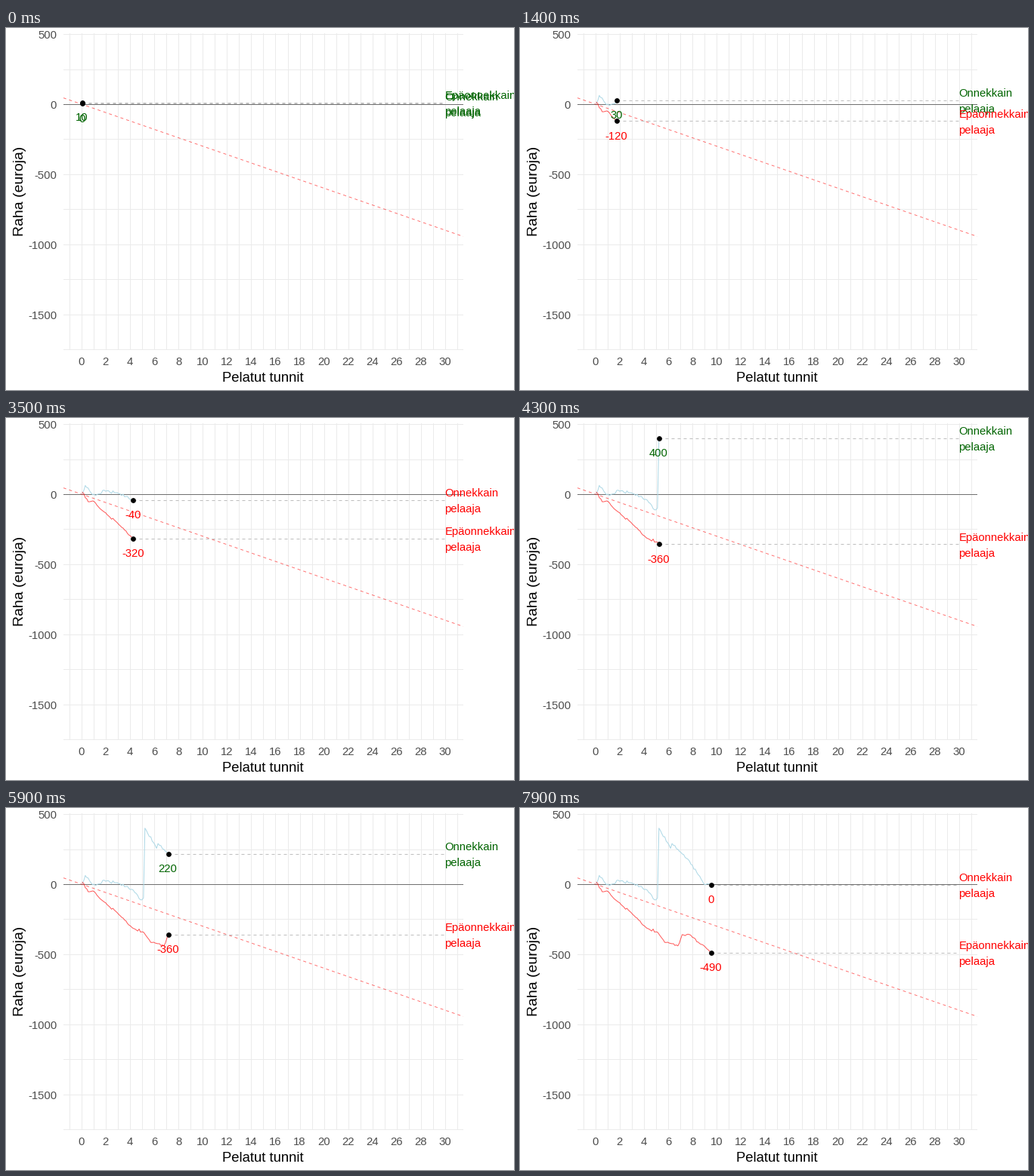
Animation of 672 by 480 pixels, one loop 8000 ms. Source, as a matplotlib script:

```python
import numpy as np
import matplotlib.pyplot as plt
from matplotlib.animation import FuncAnimation

plt.rcParams["font.family"] = "Liberation Sans"

W, H, DPI = 672, 480, 96
PX = 72 / DPI                                # one pixel in points
FRAMES, INTERVAL = 80, 100
HOURS = 0.07 + 0.12 * np.arange(FRAMES)      # hours played in each frame
LEFT, RIGHT, TOP, BOTTOM = 75.87, 605.02, 6.5, 426.5
LOW, HIGH = -1752.8, 508.9
EURO_PER_PX = (HIGH - LOW) / (BOTTOM - TOP)
GREY, GRID = "#4d4d4d", "#ebebeb"

# Turning points of each balance: (hours, euros)
LUCKY = [(.07, 4), (.31, 62), (.9, -4), (1.6, 3), (1.75, 27), (2.95, 10),
         (4.27, -43), (4.9, -116), (5.11, -98), (5.23, 400), (6.07, 278),
         (6.19, 256), (6.31, 290), (7.15, 216), (7.63, 178), (9, -6),
         (9.55, -4)]
UNLUCKY = [(.07, 13), (.57, -58), (1, -48), (1.75, -119), (2.95, -204),
           (4.27, -316), (5.15, -342), (5.7, -416), (6.07, -420),
           (6.83, -440), (7.15, -360), (7.7, -356), (9.55, -490)]

fig = plt.figure(figsize=(W / DPI, H / DPI), dpi=DPI, facecolor="white")
ax = fig.add_axes([LEFT / W, 1 - BOTTOM / H,
                   (RIGHT - LEFT) / W, (BOTTOM - TOP) / H])
ax.set(xlim=(-1.5, 31.5), ylim=(LOW, HIGH))
ax.axis("off")


def wander(keys, seed, jitter=11):
    """Balance per frame: straight runs with noise that fades at each key."""
    hours, euros = np.transpose(keys)
    leg = np.interp(HOURS, hours, np.arange(len(keys)))
    noise = np.random.default_rng(seed).uniform(-jitter, jitter, FRAMES)
    return np.interp(HOURS, hours, euros) + noise * np.sin(np.pi * leg)


def stroke(xs, ys, color, z, dashed=False, alpha=1):
    return ax.plot(xs, ys, color=color, lw=PX, zorder=z, alpha=alpha,
                   ls=(0, (4, 4)) if dashed else "-")[0]


def page_text(x, y, s, size, color="black", ha="center", **kw):
    fig.text(x / W, 1 - y / H, s, size=size, color=color, ha=ha,
             va="baseline", **kw)


for h in range(-1, 32):
    stroke([h, h], [LOW, HIGH], GRID, 0)
    if h % 2 == 0:
        page_text(99.8 + 16.035 * h, 447, str(h), 11.2, GREY)
for e in range(-1750, 501, 250):
    stroke([-1.5, 31.5], [e, e], GRID, 0)
    if e % 500 == 0:
        page_text(67.2, 107 - e / EURO_PER_PX, str(e), 11.2, GREY, "right")
page_text(339.5, 469, "Pelatut tunnit", 13.9)
page_text(23, 216, "Raha (euroja)", 14.5, rotation=90,
          rotation_mode="anchor")

stroke([-1.5, 31.5], [0, 0], "#707070", 1)
stroke([-1.5, 31.5], [45, -945], "red", 1, dashed=True, alpha=0.55)


class Player:
    def __init__(self, name, euros, color, alpha, z):
        self.euros = euros
        self.trail = stroke([], [], color, 2, alpha=alpha)
        self.guide = stroke([], [], "#bebebe", 3, dashed=True)
        self.dot, = ax.plot([], [], "o", color="black", ms=6.8 * PX, mew=0,
                            zorder=4)
        font = dict(size=11.1, va="baseline", zorder=z)
        self.value = ax.text(0, 0, "", ha="center", **font)
        self.names = [ax.text(29.97, 0, s, **font) for s in (name, "pelaaja")]

    def show(self, i):
        h, v = HOURS[i], self.euros[i]
        self.trail.set_data(HOURS[:i + 1], self.euros[:i + 1])
        self.guide.set_data([h, 30], [v, v])
        self.dot.set_data([h], [v])
        self.value.set_text(str(int(round(v / 10)) * 10))
        self.value.set_position((h - 0.03, v - 24.5 * EURO_PER_PX))
        for text, drop in zip(self.names, (-4.5, 16.5)):
            text.set_y(v - drop * EURO_PER_PX)
        for text in (self.value, *self.names):
            text.set_color("darkgreen" if v > 0 else "red")


players = [Player("Onnekkain", wander(LUCKY, 3), "lightblue", 1, 5),
           Player("Epäonnekkain", wander(UNLUCKY, 8), "red", 0.65, 6)]


def update(i):
    for player in players:
        player.show(i)
    return []


anim = FuncAnimation(fig, update, frames=FRAMES, interval=INTERVAL,
                     repeat=True, repeat_delay=0, blit=False)
plt.show()
```
